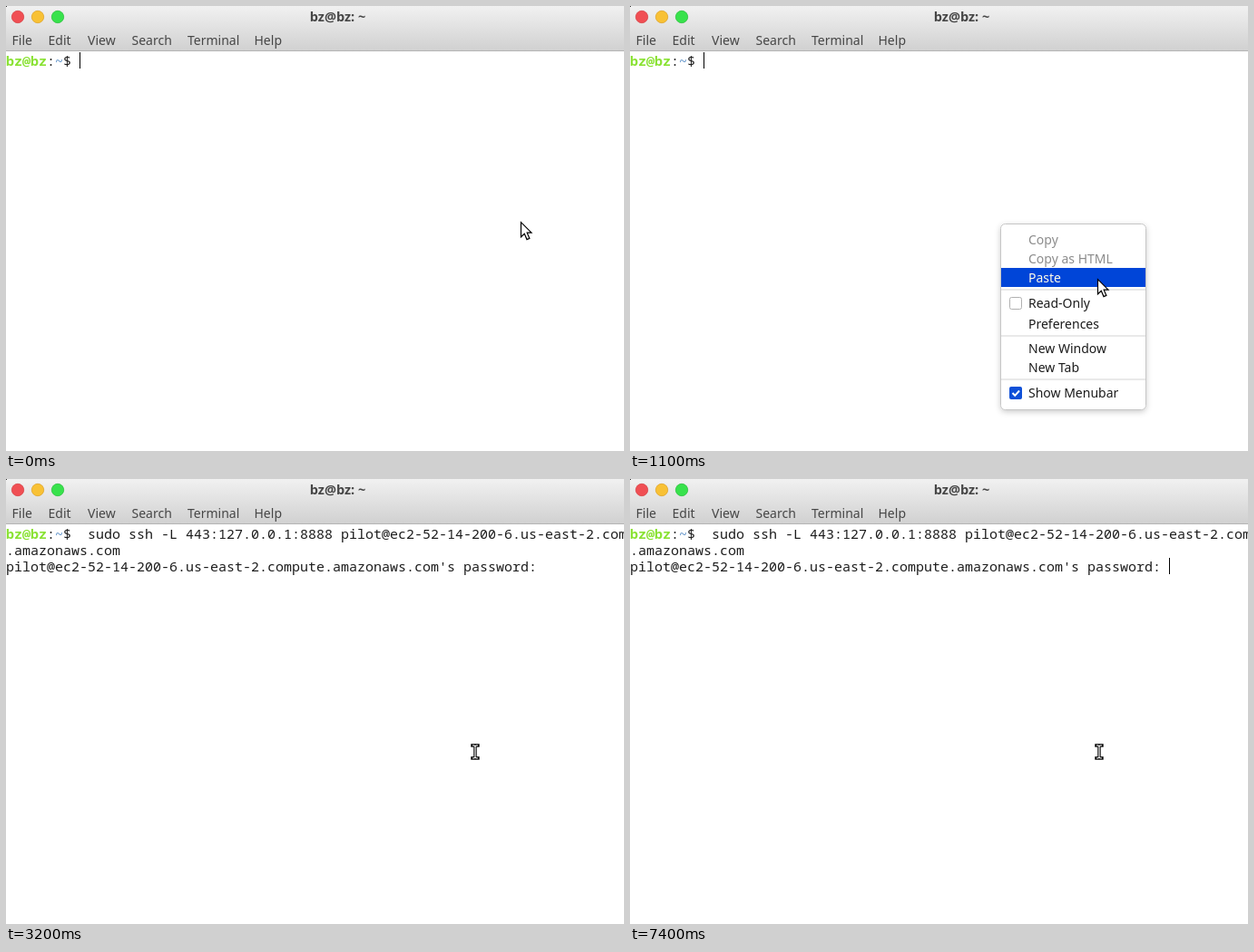
An HTML page that plays this animation: 681x491 px, repeating every 8000 ms.

```html
<!DOCTYPE html>
<html lang="en">
<head>
<meta charset="utf-8">
<title>Terminal</title>
<style>
html, body { margin: 0; width: 100%; height: 100%; overflow: hidden; background: #fff; }
svg { display: block; width: 681px; height: 491px; }
text { white-space: pre; }
.ui { font: 14px "Noto Sans", "Open Sans", sans-serif; fill: #1c1c1c; }
.bar { fill: #464646; }
.title { font: bold 14.5px "Noto Sans", "Open Sans", sans-serif; fill: #464646; text-anchor: middle; }
.mono { font: 15px "Noto Sans Mono", "DejaVu Sans Mono", monospace; fill: #1c1c1c; }
.user { fill: #8ae234; font-weight: bold; }
.path { fill: #729fcf; font-weight: bold; }
.off { fill: #8c8c8c; }
.sep { stroke: #e2e2e2; stroke-width: 1.5; }
.anim { animation: 8s step-end infinite; }

#caret1 { animation-name: caret1; }
#caret2 { animation-name: caret2; }
#caret3 { animation-name: caret3; }
#menu { animation-name: menu; }
#pasteRow { animation-name: pasteRow; }
#pasteText { animation-name: pasteText; }
#readRow { animation-name: readRow; }
#readText { animation-name: readText; }
#readBox { animation-name: readBox; }
#arrow { animation-name: arrowMove, arrowShow; }
#beam { animation-name: beam; }
#command { animation-name: command; }
#login { animation-name: login; }

@keyframes caret1 { 0%, 5% { opacity: 1 } 2.5%, 18.75%, 100% { opacity: 0 } }
@keyframes caret2 { 0%, 25%, 100% { opacity: 0 } 18.75% { opacity: 1 } }
@keyframes caret3 {
  0%, 40%, 55%, 70%, 85% { opacity: 0 }
  32.5%, 47.5%, 62.5%, 77.5%, 92.5%, 100% { opacity: 1 }
}
@keyframes menu { 0%, 18.75%, 100% { opacity: 0 } 5% { opacity: .6 } 6.25% { opacity: 1 } 17.5% { opacity: .4 } }
@keyframes pasteRow { 0%, 100% { fill: #fff } 11.25% { fill: #f9fcfe } 12.5% { fill: #0045d8 } }
@keyframes pasteText { 0%, 100% { fill: #1c1c1c } 12.5% { fill: #fffbe8 } }
@keyframes readRow { 0%, 12.5%, 100% { opacity: 0 } 10% { opacity: 1 } }
@keyframes readText { 0%, 12.5%, 100% { fill: #1c1c1c } 10% { fill: #fff } }
@keyframes readBox {
  0%, 12.5%, 100% { fill: #fff; stroke: #b0b0b0 }
  10% { fill: #0045d8; stroke: #8ea9d8 }
}
@keyframes arrowMove {
  0% { transform: translate(567px, 238px) }
  8.75% { transform: translate(568px, 274px) }
  10% { transform: translate(549px, 319px) }
  11.25% { transform: translate(529px, 311px) }
  12.5% { transform: translate(519px, 304px) }
  13.75%, 100% { transform: translate(515px, 301px) }
}
@keyframes arrowShow { 0%, 5% { opacity: 1 } 2.5%, 18.75%, 100% { opacity: 0 } }
@keyframes beam {
  0%, 5% { opacity: 0; transform: translate(567px, 238px) }
  2.5% { opacity: 1; transform: translate(567px, 238px) }
  18.75%, 100% { opacity: 1; transform: translate(517px, 301px) }
}
@keyframes command { 0% { opacity: 0 } 18.75%, 100% { opacity: 1 } }
@keyframes login { 0% { opacity: 0 } 32.5%, 100% { opacity: 1 } }
</style>
</head>
<body>
<svg viewBox="0 0 681 491">
  <defs>
    <linearGradient id="chrome" x2="0" y2="1">
      <stop offset="0" stop-color="#f1f1f1"/>
      <stop offset="1" stop-color="#d0d0d0"/>
    </linearGradient>
    <filter id="shadow" x="-10%" y="-10%" width="120%" height="120%">
      <feDropShadow dx="0" dy="2" stdDeviation="3" flood-opacity=".2"/>
    </filter>
  </defs>

  <rect width="681" height="491" fill="#fff"/>

  <!-- Window header -->
  <rect width="681" height="50" fill="url(#chrome)"/>
  <rect y="49" width="681" height="1" fill="#b4b4b4"/>
  <rect width="1" height="1" fill="#333"/>
  <circle cx="13" cy="12" r="6.7" fill="#f04f54" stroke="#d9464a" stroke-width=".8"/>
  <circle cx="35" cy="12" r="6.7" fill="#f8c135" stroke="#dfa52c" stroke-width=".8"/>
  <circle cx="57" cy="12" r="6.7" fill="#38e24c" stroke="#2fc141" stroke-width=".8"/>
  <text class="title" x="365.5" y="17">bz@bz: ~</text>
  <g class="ui bar">
    <text x="6.5" y="43">File</text>
    <text x="46.5" y="43">Edit</text>
    <text x="90" y="43">View</text>
    <text x="138.5" y="43">Search</text>
    <text x="200" y="43">Terminal</text>
    <text x="273.5" y="43">Help</text>
  </g>

  <!-- Shell -->
  <g class="mono">
    <text x="0" y="66"><tspan class="user">bz@bz</tspan>:<tspan class="path">~</tspan>$</text>
    <g id="command" class="anim">
      <text x="90" y="66">sudo ssh -L 443:127.0.0.1:8888 pilot@ec2-52-14-200-6.us-east-2.compute</text>
      <text x="0" y="84">.amazonaws.com</text>
    </g>
    <text id="login" class="anim" x="0" y="102">pilot@ec2-52-14-200-6.us-east-2.compute.amazonaws.com's password:</text>
  </g>
  <rect id="caret1" class="anim" x="81" y="51" width="1" height="18"/>
  <rect id="caret2" class="anim" x="0" y="87" width="1" height="18"/>
  <rect id="caret3" class="anim" x="594" y="87" width="1" height="18"/>

  <!-- Context menu -->
  <g id="menu" class="anim ui">
    <rect x="408.5" y="240.5" width="160" height="205" rx="5" fill="#fff" stroke="#c6c6c6" filter="url(#shadow)"/>
    <rect id="pasteRow" class="anim" x="409" y="289" width="159" height="21" fill="#fff"/>
    <path class="sep" d="M409 313h159M409 364h159M409 412h159"/>
    <rect id="readRow" class="anim" x="409" y="316" width="159" height="24" fill="#0045d8"/>
    <text class="off" x="439" y="263">Copy</text>
    <text class="off" x="439" y="284">Copy as HTML</text>
    <text id="pasteText" class="anim" x="439" y="305">Paste</text>
    <text id="readText" class="anim" x="439" y="333">Read-Only</text>
    <text x="439" y="356">Preferences</text>
    <text x="439" y="383">New Window</text>
    <text x="439" y="404">New Tab</text>
    <text x="439" y="432">Show Menubar</text>
    <rect id="readBox" class="anim" x="418.5" y="321.5" width="13" height="13" rx="2"/>
    <rect x="418" y="420" width="14" height="14" rx="2" fill="#0f50d8"/>
    <path d="M421.5 427l2.7 2.8 4.8-5.3" fill="none" stroke="#fff" stroke-width="2"/>
  </g>

  <!-- Pointers -->
  <g id="arrow" class="anim">
    <path d="M.5.7V16.8L4.3 13.2 7 19.6 9.9 18.4 7.2 12.2H12Z" fill="#fff" stroke="#000" stroke-width="1.2"/>
  </g>
  <g id="beam" class="anim" fill="none">
    <path d="M-3-7h2l1 1 1-1h2M0-6V6M-3 7h2l1-1 1 1h2" stroke="#000" stroke-width="3.4" stroke-linecap="square"/>
    <path d="M-3-7h2l1 1 1-1h2M0-6V6M-3 7h2l1-1 1 1h2" stroke="#fff" stroke-width="1.2"/>
  </g>
</svg>
</body>
</html>
```
